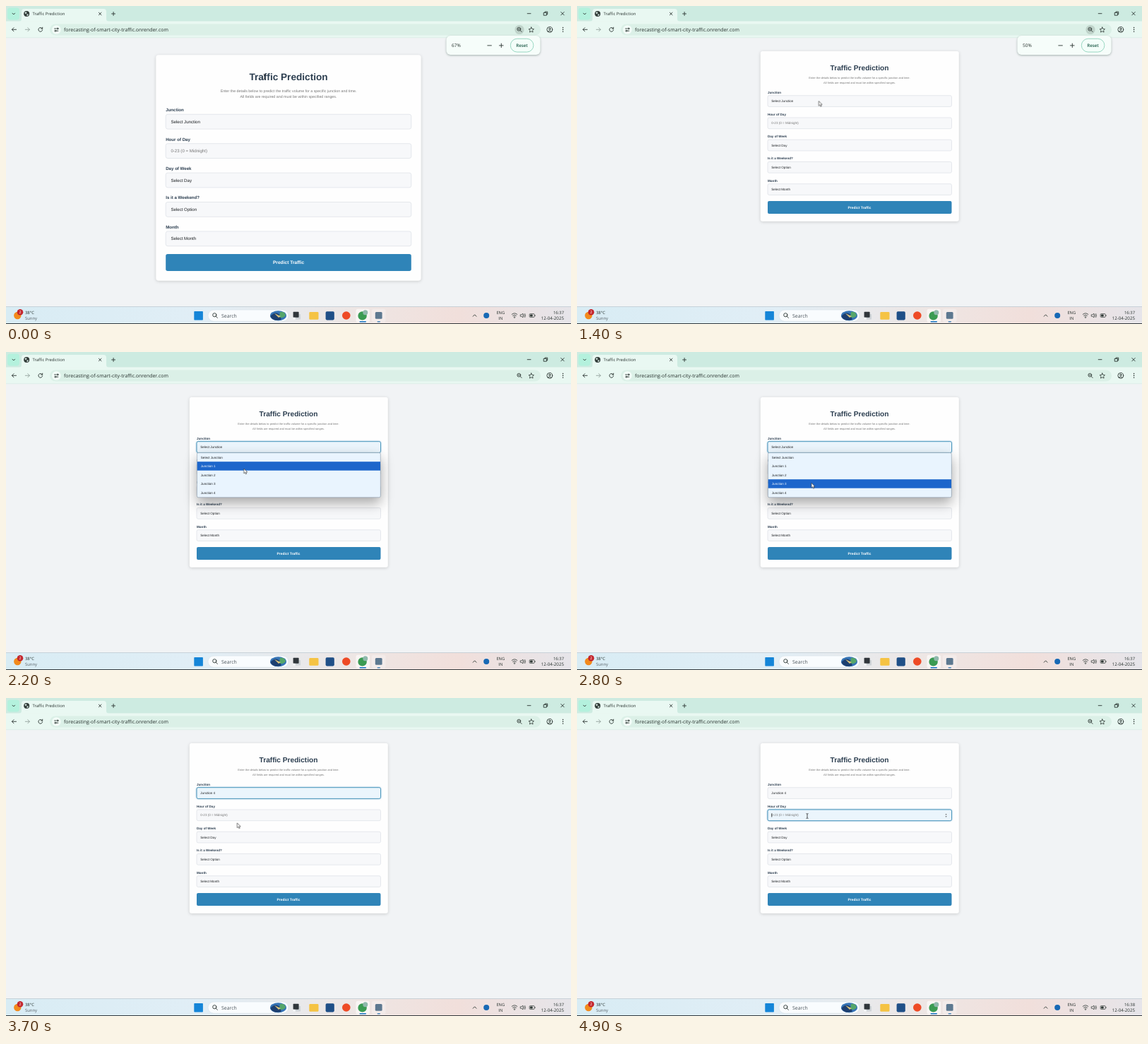
Animation of 800x450 px, one loop 5 s. Source, as an HTML page:

```html
<!DOCTYPE html>
<html lang="en">
<head>
<meta charset="utf-8">
<title>Traffic Prediction</title>
<style>
html, body { margin: 0; width: 100%; height: 100%; overflow: hidden; background: #f1f3f5; }
svg { display: block; width: 800px; height: 450px; text-rendering: geometricPrecision; }
.ui { font-family: "Open Sans", "Noto Sans", sans-serif; fill: #26302d; }
.page { font-family: "Liberation Sans", Arial, sans-serif; fill: #1c1f22; }
.bold { font-weight: 700; fill: #2c3e50; }
.hint { fill: #777; }
.mid { text-anchor: middle; }
.end { text-anchor: end; }
.line { fill: none; stroke: #2b3531; stroke-width: .9; stroke-linecap: round; stroke-linejoin: round; }
.card { fill: #fefefe; filter: drop-shadow(0 1px 2px rgba(0,0,0,.16)); }
.field { fill: #f7f8fa; stroke: #dce0e5; stroke-width: .7; }
.focus rect { fill: #ebf5fc; stroke: #3f8fb6; stroke-width: .9; filter: drop-shadow(0 0 .8px rgba(46,134,193,.5)); }
.menu { fill: #e9f4fe; stroke: #8796a5; stroke-width: .6; filter: drop-shadow(0 8px 9px rgba(0,0,0,.34)); }
.bubble { fill: #f6fdfa; filter: drop-shadow(0 1px 1.6px rgba(0,40,25,.32)); }
.pick { animation: pick 5s linear infinite; }
.type { animation: type 5s linear infinite; }
#pointer { animation: path 5s linear infinite; }
@keyframes pick { 0%, 38% { opacity: 0 } 42%, 90% { opacity: 1 } 96%, 100% { opacity: 0 } }
@keyframes type { 0%, 90% { opacity: 0 } 96%, 100% { opacity: 1 } }
@keyframes path {
  0% { transform: translate(366px, 100px) }
  14% { transform: translate(366px, 100px); animation-timing-function: steps(7) }
  28% { transform: translate(342.3px, 134.5px) }
  34% { transform: translate(342px, 134.5px); animation-timing-function: steps(5) }
  44% { transform: translate(336.8px, 165px); animation-timing-function: steps(6) }
  56% { transform: translate(332px, 185.3px); animation-timing-function: steps(3) }
  62% { transform: translate(331px, 198.3px) }
  68% { transform: translate(331px, 198.3px); animation-timing-function: steps(3) }
  74% { transform: translate(327.3px, 176.8px); animation-timing-function: steps(3) }
  80%, 100% { transform: translate(326px, 167px) }
}
</style>
</head>
<body>
<svg id="stage" viewBox="0 0 800 450"></svg>
<script>
const LOOP = 5000, ZOOM = 300, OPEN = 1900, CHOSEN = 3400, CLOCK = 4000, CLICK = 4500;
const rules = new Set();

const text = (x, y, size, str, cls = '') =>
  `<text x="${x}" y="${y}" font-size="${size}" class="${cls}">${str}</text>`;
const box = (x, y, w, h, r, attr) =>
  `<rect x="${x}" y="${y}" width="${w}" height="${h}" rx="${r}" ${attr}/>`;
const dot = (x, y, r, fill) => `<circle cx="${x}" cy="${y}" r="${r}" fill="${fill}"/>`;
const line = (d, attr = '') => `<path class="line" d="${d}" ${attr}/>`;

// Content visible only between two times in ms
function during(from, to, content) {
  const name = `on${from}to${to}`;
  rules.add(`@keyframes ${name} {
    0% { opacity: ${from ? 0 : 1} } ${from / LOOP * 100}% { opacity: 1 }
    ${to < LOOP ? `${to / LOOP * 100}% { opacity: 0 }` : '100% { opacity: 1 }'} }`);
  return `<g style="animation: ${name} 5s step-end infinite">${content}</g>`;
}

const big = {
  k: .349, card: [212.3, 69.3, 375.4, 319.5, 4], title: 105, sub: [122.3, 130],
  x: 226.2, w: 347.6, y: 153.3, h: 20.8, pitch: 41.4, label: 149.1, value: 165.8, pad: 7.2,
  button: [351, 24, 365.2]
};
const small = {
  k: .2604, card: [259.8, 64, 281, 240.8, 3], title: 90.5, sub: [103.4, 109.8],
  x: 270, w: 260.5, y: 126.7, h: 15.7, pitch: 31.25, label: 123.7, value: 136.2, pad: 5.3,
  button: [276, 18, 286.9]
};

const labels = ['Junction', 'Hour of Day', 'Day of Week', 'Is it a Weekend?', 'Month'];
const values = ['Select Junction', '0-23 (0 = Midnight)', 'Select Day', 'Select Option', 'Select Month'];

const fieldBox = (f, i, attr) => box(f.x, f.y + i * f.pitch, f.w, f.h, 8 * f.k, attr);
const fieldText = (f, i, str, cls) => text(f.x + f.pad, f.value + i * f.pitch, 17.6 * f.k, str, cls);

function form(f) {
  const [top, height, base] = f.button;
  const rows = labels.map((name, i) =>
    text(f.x, f.label + i * f.pitch, 17.6 * f.k, name, 'bold') + fieldBox(f, i, 'class="field"'));
  return box(...f.card, 'class="card"') +
    text(400, f.title, 39 * f.k, 'Traffic Prediction', 'bold mid') +
    text(400, f.sub[0], 15.2 * f.k, 'Enter the details below to predict the traffic volume for a specific junction and time.', 'hint mid') +
    text(400, f.sub[1], 15.2 * f.k, 'All fields are required and must be within specified ranges.', 'hint mid') +
    rows.join('') +
    box(f.x, top, f.w, height, 8 * f.k, 'fill="#2f84b8"') +
    `<g style="fill:#fff">${text(400, base, 19 * f.k, 'Predict Traffic', 'mid').replace('<text', '<text font-weight="700"')}</g>`;
}

const valuesFrom = (f, start) =>
  values.slice(start).map((v, i) => fieldText(f, i + start, v, i + start === 1 ? 'hint' : '')).join('');

function menu() {
  const items = ['Select Junction', 'Junction 1', 'Junction 2', 'Junction 3', 'Junction 4'];
  const hover = [OPEN, 2100, 2300, 2700, 3000, CHOSEN];
  const item = (i) => text(275.8, 150.6 + 12.5 * i, 4.58, items[i]);
  return box(270.4, 142.6, 259.9, 63.2, 2, 'class="menu"') +
    items.map((_, i) => item(i)).join('') +
    items.map((_, i) => during(hover[i], hover[i + 1],
      box(270.7, 142.7 + 12.5 * i, 259.3, 12.5, 0, 'fill="#1d66cb"') +
      `<g fill="#fff">${item(i)}</g>`)).join('');
}

function page() {
  return `<g class="page">` +
    during(0, ZOOM, form(big) + valuesFrom(big, 0)) +
    during(ZOOM, LOOP, form(small) +
      `<g class="focus pick">${fieldBox(small, 0, '')}</g>` +
      `<g class="focus type">${fieldBox(small, 1, '')}</g>` +
      valuesFrom(small, 1) +
      during(ZOOM, CHOSEN, fieldText(small, 0, values[0])) +
      during(CHOSEN, LOOP, fieldText(small, 0, 'Junction 4')) +
      during(CLOCK, LOOP, '<path d="M521.4 165.2l1.2-1.5 1.2 1.5zM521.4 167.2l1.2 1.5 1.2-1.5z" fill="#555"/>') +
      during(CLICK, LOOP, box(275.4, 163.3, .8, 5.2, 0, 'fill="#222"'))) +
    during(OPEN, CHOSEN, menu()) + '</g>';
}

const lens = (x, y, r) =>
  `<circle class="line" cx="${x}" cy="${y}" r="${r}"/>` + line(`M${x + r * .7} ${y + r * .7}l${r * .9} ${r * .9}`);

function browser() {
  return `<g class="ui">` +
    box(0, 0, 800, 22, 0, 'fill="#cdebe1"') +
    box(2, 2.5, 17, 17, 4, 'fill="#b4f1dd"') + line('M9 10.2l1.8 1.8 1.8-1.8') +
    '<path d="M18 22q4 0 4-4V8q0-4 4-4h112q4 0 4 4v10q0 4 4 4z" fill="#e9f8f2"/>' +
    dot(29.2, 11, 4, '#333d3a') +
    '<path d="M26.4 9.2l2.2-1 .8 1.6-1.4 1.6zM29.6 11.6l2.2-.2-.6 2-1.6.6z" fill="#d9ebe4"/>' +
    text(37.5, 13.2, 5.85, 'Traffic Prediction') +
    line('M131.4 9.2l3.6 3.6m0-3.6l-3.6 3.6M149.6 11h5M152.1 8.5v5') +
    line('M738.2 10.7h4.8M761.6 9.4h3.8v3.8h-3.8zM763 9.2v-1.1h3.7v3.8h-1M785.8 8.5l4.4 4.4m0-4.4l-4.4 4.4', 'stroke-width=".7"') +
    box(0, 21.5, 800, 23.5, 0, 'fill="#e9f8f2"') +
    box(0, 44.6, 800, .6, 0, 'fill="#d5e4de"') +
    box(62, 25.5, 695, 16, 8, 'fill="#dbf0e7"') +
    line('M14.5 33.3h-6M11 30.7l-2.6 2.6 2.6 2.6') +
    line('M27.3 33.3h6M30.8 30.7l2.6 2.6-2.6 2.6', 'style="stroke:#93a39c"') +
    line('M51.2 31.7a2.9 2.9 0 1 0 .5 2.2M51.7 30.2v2h-2') +
    dot(71.4, 33.5, 6.3, '#f3fcf8') +
    line('M68.6 32h2.3M73.8 35.2h-2.3') +
    '<circle class="line" cx="73" cy="32" r="1"/><circle class="line" cx="69.8" cy="35.2" r="1"/>' +
    text(82, 36, 6.94, 'forecasting-of-smart-city-traffic.onrender.com') +
    during(0, OPEN, dot(727, 33.5, 6.6, '#bfd3ca')) +
    lens(726.3, 32.7, 2.4) + line('M725.3 32.7h2', 'stroke-width=".6"') +
    line('M743.8 30l1.1 2.4 2.6.3-1.9 1.8.5 2.6-2.3-1.3-2.3 1.3.5-2.6-1.9-1.8 2.6-.3z', 'style="stroke-width:.8"') +
    '<circle class="line" cx="769.8" cy="33.4" r="3.9"/><circle class="line" cx="769.8" cy="32.4" r="1.2"/>' +
    line('M767.3 36q2.5-2.2 5 0') +
    [30.6, 33.4, 36.2].map(y => dot(788.6, y, .8, '#2b3531')).join('') +
    during(0, OPEN,
      box(623.5, 42, 133, 27, 6, 'class="bubble"') +
      during(0, ZOOM, text(631, 58.2, 6.5, '67%')) +
      during(ZOOM, LOOP, text(631, 58.2, 6.5, '50%')) +
      line('M681.8 55.9h5.6M698.5 55.9h5.6M701.3 53.1v5.6') +
      box(714.3, 46.3, 32.6, 18.8, 9.4, 'fill="#f3fdf9" stroke="#8fd3bd" stroke-width=".9"') +
      `<g fill="#1d5b49" font-weight="600">${text(730.5, 58.2, 6.2, 'Reset', 'mid')}</g>`) +
    '</g>';
}

function taskbar() {
  return `<defs><linearGradient id="bar">
      <stop stop-color="#d8ecf4"/><stop offset=".35" stop-color="#e1eef6"/>
      <stop offset=".62" stop-color="#eee6e4"/><stop offset=".8" stop-color="#f1dfdb"/>
      <stop offset="1" stop-color="#e6e5ea"/></linearGradient></defs><g class="ui">` +
    box(0, 425.5, 800, 24.5, 0, 'fill="url(#bar)"') +
    box(0, 425, 800, .7, 0, 'fill="#b9c6cf"') +
    box(0, 449.1, 800, .9, 0, 'fill="#20262a"') +
    dot(16.3, 438, 5.2, '#f28a1c') + dot(20, 433.2, 4.3, '#c4262d') +
    `<g fill="#fff">${text(20, 435.2, 5.4, '2', 'mid')}</g>` +
    text(27, 436.3, 5.9, '38°C') + `<g fill="#59636a">${text(27, 444.2, 5.9, 'Sunny')}</g>` +
    box(266.3, 432, 12.6, 12.6, .8, 'fill="#1585d8"') +
    box(286, 430, 114, 16.2, 8.1, 'fill="#f9fcfe" stroke="#d3dde4" stroke-width=".5"') +
    lens(295.3, 437.2, 2.6) +
    `<g fill="#4c555b">${text(305, 440.7, 6.9, 'Search')}</g>` +
    '<ellipse cx="385.5" cy="438.3" rx="11.5" ry="7" fill="#3674b5"/>' +
    '<path d="M374.5 439q5-6 10-4t5 9q-12 3-15-5z" fill="#1d3f70"/>' +
    '<path d="M388 433q7-1 8 5-4 5-9 2z" fill="#55a66a"/><path d="M380 435l9 4-3 2z" fill="#d8c27a"/>' +
    box(409.5, 436, 7.6, 7.6, .8, 'fill="#cfd4d8"') + box(406.6, 432.8, 8, 8, .8, 'fill="#30363b"') +
    box(406.6, 440.8, 3, 2.8, 0, 'fill="#f6f8f9"') +
    box(429.3, 433, 13.2, 10.8, 1.4, 'fill="#f5c344"') +
    box(452.6, 432.2, 12.2, 12.2, 1.8, 'fill="#1f4f87"') +
    dot(481.8, 438, 5.8, '#ee4a25') +
    box(495.5, 428.8, 19.5, 18.6, 2.5, 'fill="#fbf9f8" fill-opacity=".8"') +
    dot(504.6, 438.4, 6.2, '#3b9b53') + dot(508.8, 433.8, 3.5, '#8fb9ac') +
    box(500.5, 446, 9.5, 1.4, .7, 'fill="#1675c4"') +
    box(518, 428.8, 19.5, 18.6, 2.5, 'fill="#fbf9f8" fill-opacity=".35"') +
    box(522.8, 433, 9.8, 9.8, 1.5, 'fill="#5d7890"') +
    box(525.6, 446, 4.4, 1.4, .7, 'fill="#4d89bb"') +
    line('M661.2 439.2l2.4-2.4 2.4 2.4') +
    dot(680.2, 438, 4, '#1769b5') +
    text(700.3, 436.4, 5.8, 'ENG', 'mid') + text(700.3, 444.3, 5.8, 'IN', 'mid') +
    line('M716.2 436.4q3.8-3.4 7.6 0M717.6 438.2q2.4-2.2 4.8 0M719 439.9q1-.9 2 0', 'style="stroke-width:.8"') +
    dot(720, 441, .7, '#2b3531') +
    line('M728.6 436.8h1.4l2-1.8v6l-2-1.8h-1.4zM733.5 436.6q1 1.4 0 2.8M734.8 435.4q1.8 2.6 0 5.2', 'style="stroke-width:.7"') +
    box(741.2, 435.6, 7, 4.8, 1, 'fill="none" stroke="#2b3531" stroke-width=".7"') +
    box(742.1, 436.5, 3.6, 3, .4, 'fill="#2b3531"') + box(748.6, 437, .8, 2, .3, 'fill="#2b3531"') +
    during(0, CLOCK, text(790, 436.4, 5.9, '16:37', 'end')) +
    during(CLOCK, LOOP, text(790, 436.4, 5.9, '16:38', 'end')) +
    text(790, 444.3, 6.2, '12-04-2025', 'end') + '</g>';
}

function pointer() {
  const beam = '<path d="M-1.5-3.4q1.5 0 1.5.8 0-.8 1.5-.8M0-2.6v5.2M-1.5 3.4q1.5 0 1.5-.8 0 .8 1.5.8" fill="none" stroke="#222" stroke-width=".8"/>';
  const arrow = '<path d="M0 0v6.8l1.6-1.4 1.1 2.4 1.1-.5-1-2.3h2.1z" fill="#fff" stroke="#333" stroke-width=".65" stroke-linejoin="round"/>';
  return `<g id="pointer">${during(0, 1000, beam)}${during(1000, CLOCK, arrow)}${during(CLOCK, LOOP, beam)}</g>`;
}

const art = box(0, 45, 800, 381, 0, 'fill="#f1f3f5"') + page() + browser() + taskbar() + pointer();
const sheet = document.createElement('style');
sheet.textContent = [...rules].join('\n');
document.head.append(sheet);
document.getElementById('stage').innerHTML = art;
</script>
</body>
</html>
```
